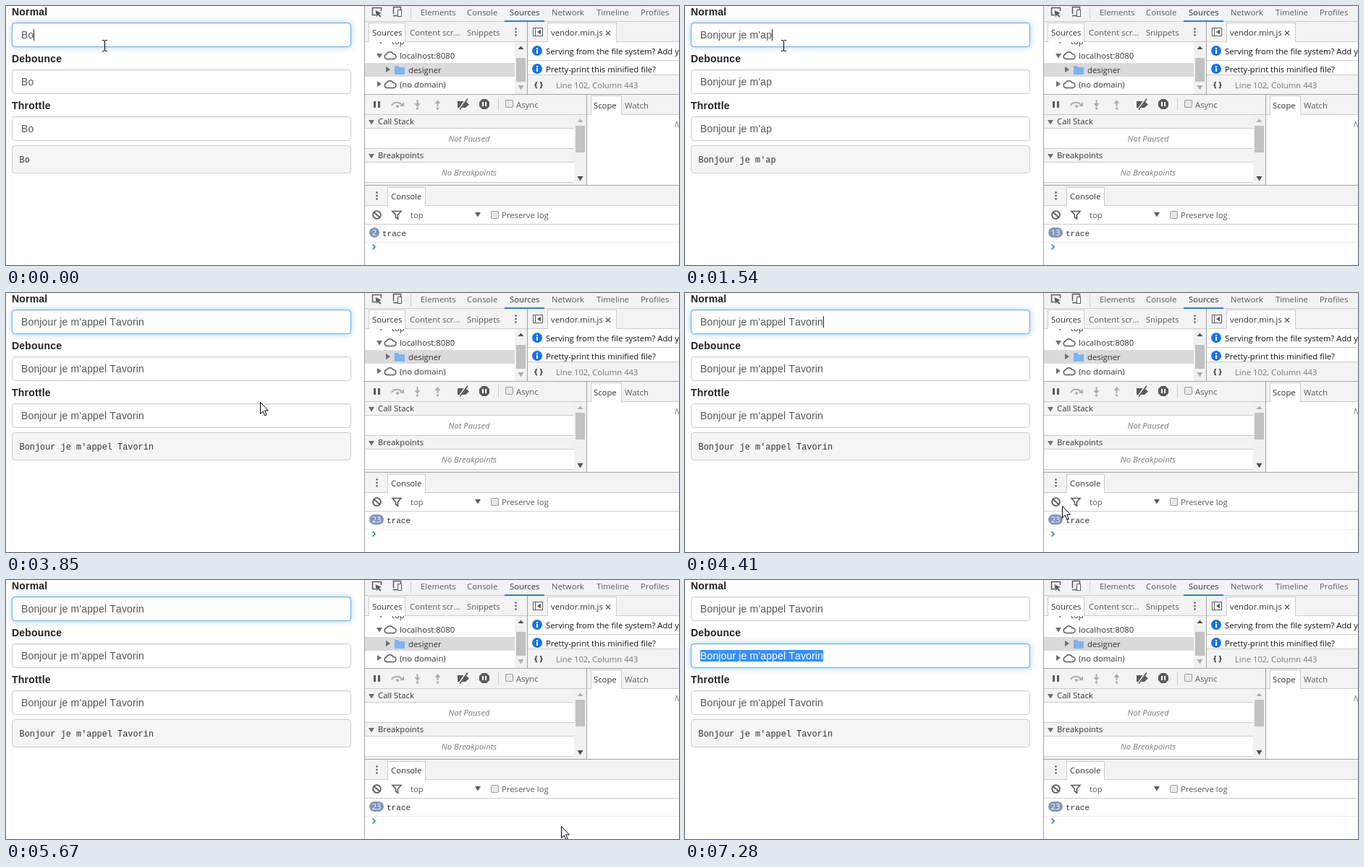
Write an HTML page that moves like this. It is 930 by 359 pixels and loops after 8 s.

```html
<!DOCTYPE html>
<html lang="en">
<head>
<meta charset="utf-8">
<title>Debounce and throttle demo</title>
<style>
html, body { margin: 0; width: 100%; height: 100%; overflow: hidden; background: #fff; }
svg { display: block; width: 930px; height: 359px; }
text { white-space: pre; font: 11.3px "Open Sans", "Noto Sans", sans-serif; fill: #5a5a5a; }
text.dark { fill: #333; }
text.black { fill: #111; }
text.dim { fill: #777; }
text.hint { font-size: 10.5px; fill: #444; }
text.keys { font-size: 9.8px; fill: #777; }
text.note { fill: #7b7b7b; font-style: italic; text-anchor: middle; }
text.label { font: bold 14px "Liberation Sans", Arial, sans-serif; letter-spacing: .2px; fill: #222; }
text.field { font: 14px "Liberation Sans", Arial, sans-serif; letter-spacing: .15px; font-kerning: none; fill: #555; }
text.pre { font: 11.9px "Liberation Mono", monospace; fill: #333; }
text.log { font: 11px "Liberation Mono", monospace; fill: #303030; }
text.count { font: 11px "Open Sans", sans-serif; fill: #fff; text-anchor: middle; }
</style>
</head>
<body>
<svg id="stage" viewBox="0 0 930 359" xmlns="http://www.w3.org/2000/svg"></svg>
<script>
const LOOP = 8000, STEP = 70;
const PHRASE = "Bonjour je m'appel Tavorin";
// Key press times, beginning with the third letter.
const KEYS = [70, 210, 350, 490, 560, 700, 840, 980, 1050, 1190, 1260, 1470, 1540,
  1680, 1750, 1890, 1960, 2310, 2450, 2590, 2660, 2800, 2940, 3010];
const LATE = [7, 9, 12, 13]; // lengths whose trace arrives with a later key
const BLINK = [[0, 3500], [4000, 4550], [5040, 5530], [5740, 6230], [6720, 7140]];
const TAB = 7140, POINTER_END = 6930;
const PATH = [[3640, 136, 54.5], [3710, 165, 68], [3850, 351, 151], [3990, 440, 230],
  [4130, 505, 290], [4270, 530, 310], [4480, 516, 288], [4620, 512, 281], [4830, 512, 281],
  [4970, 520, 295], [5110, 565, 330], [5180, 588, 340], [5320, 556, 311], [5530, 545, 306],
  [5600, 545, 306], [5670, 767, 341], [5740, 774, 340], [5880, 720, 290], [6090, 480, 150],
  [6230, 290, 60], [6300, 255, 48], [6440, 207, 76], [6510, 207, 98], [6580, 207, 98],
  [6650, 212, 97], [6790, 206, 98]];
const FIELDS = [23, 88, 153];

const GREY = "#f3f3f3", EDGE = "#a3a3a3", SOFT = "#ccc", ICON = "#5a5a5a", PALE = "#adadad";

const rect = (x, y, w, h, fill, extra = "") =>
  `<rect x="${x}" y="${y}" width="${w}" height="${h}" fill="${fill}" ${extra}/>`;
const text = (x, y, str, cls = "", extra = "") =>
  `<text x="${x}" y="${y}" class="${cls}" ${extra}>${str}</text>`;
const path = (d, fill, stroke = "none", width = 1, extra = "") =>
  `<path d="${d}" fill="${fill}" stroke="${stroke}" stroke-width="${width}" ${extra}/>`;
const circle = (x, y, r, fill, extra = "") =>
  `<circle cx="${x}" cy="${y}" r="${r}" fill="${fill}" ${extra}/>`;
const hline = (x, y, w, c = EDGE) => rect(x, y, w, 1, c);
const vline = (x, y, h, c = EDGE) => rect(x, y, 1, h, c);
const frame = (x, y, w, h, fill, stroke, extra = "") =>
  rect(x + .5, y + .5, w - 1, h - 1, fill, `stroke="${stroke}" ${extra}`);
const down = (x, y, c = "#6e6e6e") => path(`M${x - 4} ${y - 3}h8l-4 6.4z`, c);
const up = (x, y, c) => path(`M${x - 4} ${y + 2}h8l-4 -4.5z`, c);
const right = (x, y) => path(`M${x - 3} ${y - 4}v8l6 -4z`, "#6e6e6e");
const dots = (x, y) => [-4.5, 0, 4.5].map(d => circle(x, y + d, 1.3, ICON)).join("");
const check = (x, y) => frame(x, y, 11, 11, "#e8e8e8", "#9a9a9a", 'rx="1.5"');
const tab = (x, y, w, h) => rect(x, y, w, h, "#fff") + vline(x, y, h, SOFT) + vline(x + w - 1, y, h, SOFT) + hline(x, y, w, SOFT);
const cloud = y => path(`M526 ${y}a3.6 3.6 0 0 1 0 -7a5 5 0 0 1 9 0a3.5 3.5 0 0 1 1 7z`, "#fff", ICON, 1.4);
// Scroll track with its thumb and the centres of both arrows.
const scrollbar = (x, y, h, thumbY, thumbH, upY, downY, upFill, downFill) =>
  rect(x, y, 17, h, "#f1f1f1") + rect(x + 2, thumbY, 13, thumbH, "#c1c1c1") +
  up(x + 8.5, upY, upFill) + down(x + 8.5, downY, downFill);

function form() {
  const labels = ["Normal", "Debounce", "Throttle"];
  return FIELDS.map((y, i) =>
    text(8, y - 10, labels[i], "label") +
    rect(8, y, 469, 34, "#66afe9", `rx="4" id="glow${i}" filter="url(#blur)"`) +
    frame(8, y, 469, 34, "#fff", SOFT, 'rx="4"') +
    hline(11, y + 1, 463, "#f4f4f4") +
    frame(8, y, 469, 34, "none", "#66afe9", `rx="4" id="ring${i}"`) +
    (i === 1 ? rect(21, 97, 0, 16, "#3390ff", 'id="selection"') : "") +
    text(21, y + 22, "", "field", `id="field${i}"`)).join("") +
    frame(8, 193, 469, 39, "#f5f5f5", SOFT, 'rx="4"') +
    text(18.5, 217, "", "pre", 'id="pre"') +
    rect(0, 32, 1, 16, "#222", 'id="caret"');
}

function topBar() {
  const tabs = [[573, "Elements"], [637, "Console"], [754, "Network"], [816, "Timeline"], [877, "Profiles"]];
  return rect(496, 0, 434, 22, GREY) + hline(496, 21, 434, SOFT) +
    path("M511 12.5H506.5V2.5H518.5V7", "none", ICON, 1.5) +
    path("M510.5 6l8.5 4 -3.5 1 3 3.5 -1.5 1.2 -3 -3.5 -2 3z", ICON) +
    path("M535.5 11V1.5H545.5V5M535 13.5H541", "none", ICON, 1.5) +
    frame(541, 5, 6, 10, "#fff", ICON) + vline(559, 2, 16, SOFT) +
    tabs.map(([x, s]) => text(x, 13, s)).join("") +
    text(696, 13, "Sources", "dark") + rect(689, 20, 55, 2, "#3879d9");
}

function tree() {
  return text(533, 52.5, "top", "dark") + down(518, 49) +
    down(516, 69) + cloud(73.5) + text(544, 72.5, "localhost:8080", "dark") +
    rect(496, 79, 207, 19, "#dadada") + right(528, 88) +
    path("M537 83h5l1.5 2h7.5v10h-14z", "#7db4f0") + text(556, 92.5, "designer", "dark") +
    right(516, 108) + cloud(113.5) + text(544, 112.5, "(no domain)", "dark") +
    scrollbar(703, 50, 72, 72, 33, 58, 113, "#505050", PALE);
}

function editor() {
  const info = (y, s) => circle(734, y, 7, "#1a73e8") + rect(733, y - 1, 2, 5, "#fff") +
    rect(733, y - 4, 2, 2, "#fff") + text(746, y + 5, s, "black");
  return info(62, "Serving from the file system? Add your files here") + hline(721, 75, 209, SOFT) +
    info(87, "Pretty-print this minified file?") +
    rect(721, 95, 209, 27, GREY) + hline(721, 95, 209, SOFT) +
    text(730, 113, "{ }", "dark", 'style="font-weight:bold"') +
    text(760, 113.5, "Line 102, Column 443", "dim");
}

function fileTabs() {
  return rect(496, 22, 434, 27, GREY) + hline(496, 49, 434, SOFT) + tab(501, 23, 51, 27) +
    text(506, 41, "Sources", "dark") +
    text(558, 41, "Content scr...") + text(637, 41, "Snippets") + dots(704.5, 36) +
    tab(748, 23, 96, 27) + text(753, 41, "vendor.min.js", "dark") +
    path("M829 34.5l6 6m0 -6l-6 6", "none", ICON, 1.4) +
    frame(728, 30, 14, 12, "#fff", ICON) + vline(731, 30, 12, ICON) + path("M739 32.5v7l-5 -3.5z", ICON) +
    vline(720, 22, 100);
}

function debuggerPane() {
  const stepInto = path("M568.5 130v7", "none", PALE, 2) + path("M564.5 135h8l-4 5z", PALE) + circle(568.5, 142, 1.7, PALE);
  const stepOut = path("M596.5 139v-6", "none", PALE, 2) + path("M592.5 135h8l-4 -5z", PALE) + circle(596.5, 142, 1.7, PALE);
  const section = (y, title, note) => rect(496, y, 289, 20, GREY) +
    hline(496, y, 289, SOFT) + hline(496, y + 19, 289, SOFT) + down(505, y + 11) +
    text(514, y + 14, title, "dark") + text(640, y + 37.5, note, "note");
  return rect(496, 122, 434, 28, GREY) + hline(496, 122, 434) +
    rect(508, 132, 3, 9, ICON) + rect(514, 132, 3, 9, ICON) +
    path("M533 138a8 7 0 0 1 14 -1", "none", PALE, 2) + path("M550 133v6h-6z", PALE) + circle(541, 139, 2, PALE) +
    stepInto + stepOut +
    path("M624 132h11l5 4.5 -5 4.5h-11z", ICON) + path("M626 144l11 -16", "none", GREY, 3) + path("M627 143.5l11 -15", "none", ICON, 1.6) +
    path("M658 129h6l4 4v6l-4 4h-6l-4 -4v-6z", ICON) + rect(658, 133, 2, 6, "#fff") + rect(662, 133, 2, 6, "#fff") +
    vline(680, 127, 18, SOFT) + check(690, 130) + text(705, 140.5, "Async") +
    section(150, "Call Stack", "Not Paused") + section(197, "Breakpoints", "No Breakpoints") +
    rect(496, 244, 289, 4, GREY) + hline(496, 244, 289, SOFT) +
    scrollbar(785, 150, 98, 166, 37, 159, 239, PALE, "#505050") +
    hline(496, 150, 434, SOFT) + tab(808, 124, 43, 27) +
    text(812, 142, "Scope", "dark") + text(855, 142, "Watch") +
    text(924, 168, "Not Paused", "note", 'style="text-anchor:start"') + vline(802, 122, 126);
}

function drawer() {
  return rect(496, 248, 434, 28, GREY) + hline(496, 248, 434) + hline(496, 276, 434, SOFT) +
    dots(512.5, 263) + tab(527, 251, 53, 26) + text(532, 268, "Console", "dark") +
    circle(512.5, 289.5, 5.4, "none", `stroke="${ICON}" stroke-width="1.8"`) + path("M508.5 286l8 7", "none", ICON, 1.8) +
    path("M534 284.5h12l-4.5 5v5.5l-3 -2v-3.5z", "none", ICON, 1.6) +
    text(559, 294, "top") + down(652, 289, "#5a5a5a") +
    check(670, 284) + text(685, 294, "Preserve log") + hline(496, 302, 434, SOFT) +
    hline(496, 327, 434, "#ececec") +
    rect(502, 307, 14, 14, "#8097bd", 'rx="7" id="badge"') +
    text(509, 318, "", "count", 'id="count"') + text(520, 318.5, "trace", "log", 'id="trace"') +
    path("M506.5 330.5l3.5 3.5 -3.5 3.5", "none", "#367cf1", 1.7);
}

function tooltip() {
  return `<g id="tip">` + rect(499, 306, 122, 25, "#000", 'rx="2" opacity=".25" filter="url(#soft)"') +
    frame(498, 304, 123, 26, "#f5f5f5", "#c4c4c4", 'rx="2"') +
    text(506.5, 321, "Clear console", "hint") + text(580, 321, "Ctrl + L", "keys") + `</g>`;
}

const stage = document.getElementById("stage");
stage.innerHTML = `<defs>
  <filter id="blur" x="-5%" y="-60%" width="110%" height="220%"><feGaussianBlur stdDeviation="4"/></filter>
  <filter id="soft" x="-10%" y="-40%" width="120%" height="180%"><feGaussianBlur stdDeviation="1.5"/></filter>
  </defs>` + rect(0, 0, 930, 359, "#fff") + form() + tree() + topBar() + editor() + fileTabs() +
  debuggerPane() + drawer() + vline(495, 0, 359) + tooltip() +
  path("M.5 .5V16.5L4.2 13 6.8 18.8 9.2 17.7 6.7 12H11.5Z", "#fff", "#000", 1, 'id="arrow"') +
  path("M-3.5 -7.5h3M.5 -7.5h3M0 -7v14M-3.5 7.5h3M.5 7.5h3", "none", "#000", 1, 'id="beam"');

const $ = id => document.getElementById(id);
const set = (id, attrs) => { for (const k in attrs) $(id).setAttribute(k, attrs[k]); };
const show = (id, on) => set(id, { visibility: on ? "visible" : "hidden" });
const clamp = v => Math.max(0, Math.min(1, v));

function pointerAt(t) {
  let a = PATH[0];
  for (const b of PATH) {
    if (t < b[0]) {
      const k = clamp((t - a[0]) / (b[0] - a[0] || 1));
      return [a[1] + (b[1] - a[1]) * k, a[2] + (b[2] - a[2]) * k];
    }
    a = b;
  }
  return [a[1], a[2]];
}

function drawText(t) {
  const length = 2 + KEYS.filter(k => k <= t).length;
  const typed = PHRASE.slice(0, length);
  FIELDS.forEach((_, i) => { $("field" + i).textContent = typed; });
  $("pre").textContent = typed;

  let traced = length;
  while (LATE.includes(traced)) traced--;
  const count = PHRASE.slice(0, traced).replace(/ /g, "").length;
  const wide = count > 9;
  $("count").textContent = count;
  set("badge", { width: wide ? 20 : 14 });
  set("count", { x: wide ? 512 : 509 });
  set("trace", { x: wide ? 526 : 520 });

  const width = $("field0").getComputedTextLength();
  set("caret", { x: Math.round(21 + width) });
  show("caret", BLINK.some(([on, off]) => t >= on && t < off));
  const selected = t >= TAB;
  set("selection", { width: selected ? width : 0 });
  $("field1").style.fill = selected ? "#fff" : "";
}

function drawFocus(t) {
  const k = clamp((t - TAB + 40) / 150);
  [1 - k, k, 0].forEach((f, i) => {
    set("glow" + i, { opacity: f * .6 });
    set("ring" + i, { opacity: f });
  });
}

function drawPointer(t) {
  const [x, y] = pointerAt(t).map(Math.round);
  const inField = x > 8 && x < 477 && FIELDS.some(top => y >= top && y < top + 34);
  const alive = t < POINTER_END;
  show("arrow", alive && !inField);
  show("beam", alive && inField);
  set("arrow", { transform: `translate(${x} ${y})` });
  set("beam", { transform: `translate(${x + .5} ${y})` });
  show("tip", t >= 4690 && t < 5040);
}

function render(ms) {
  const t = Math.floor(ms % LOOP / STEP) * STEP;
  drawText(t);
  drawFocus(t);
  drawPointer(t);
}

const start = performance.now();
function tick() {
  render(performance.now() - start);
  requestAnimationFrame(tick);
}
tick();
</script>
</body>
</html>
```
